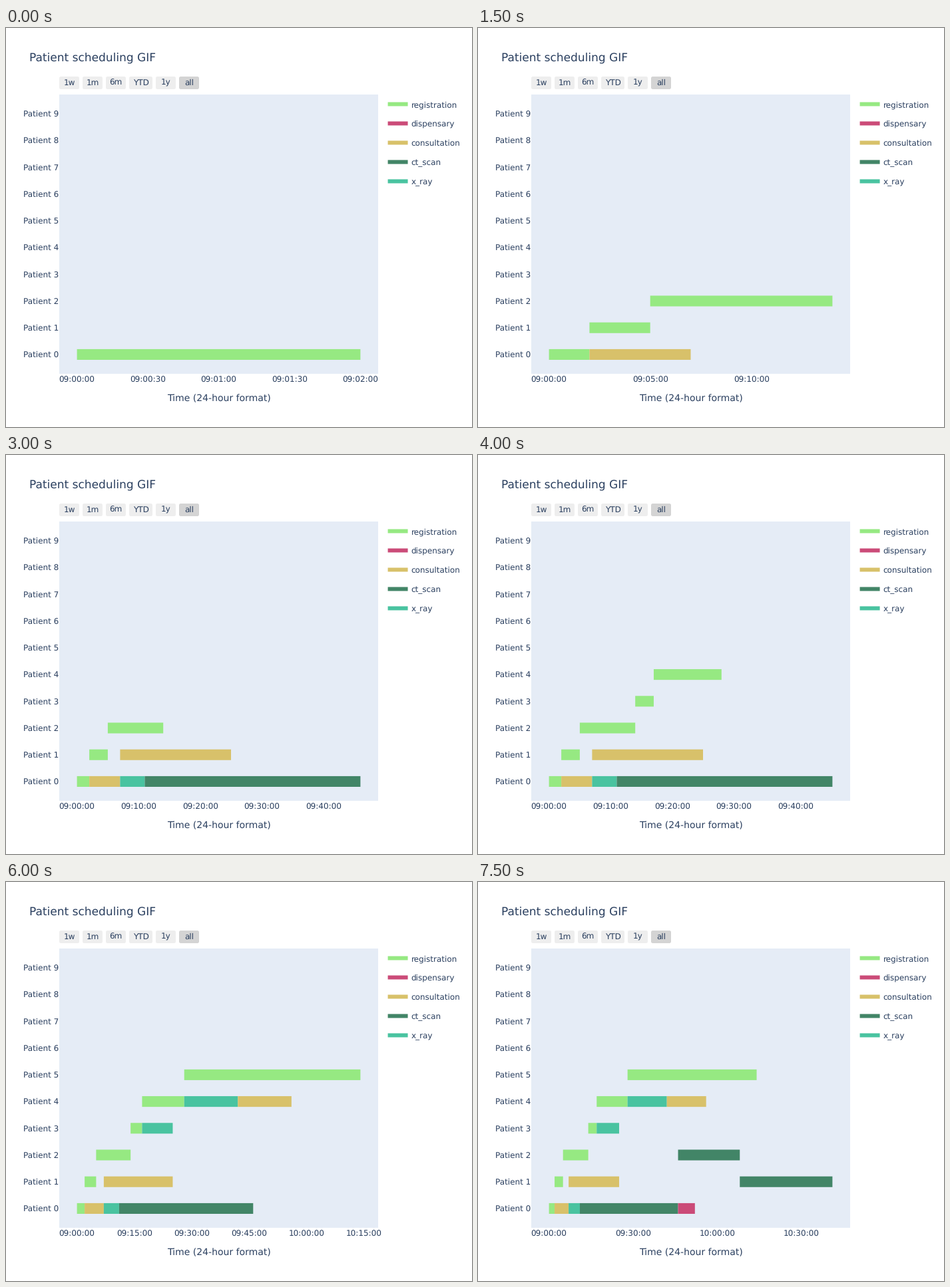
Write a matplotlib script that moves like this. It is 700 by 600 pixels and loops after 8000 ms.

```python
import matplotlib.pyplot as plt
import numpy as np
from matplotlib.animation import FuncAnimation
from matplotlib.patches import FancyBboxPatch, Rectangle

plt.rcParams.update({
    "font.family": "DejaVu Sans",
    "text.hinting": "none",
    "toolbar": "None",
})

W, H, DPI = 700, 600, 100
INK = "#2a3f5f"
LEFT, TOP, WIDTH, HEIGHT = 80, 100, 479, 420
PAD_X = WIDTH / 18
ROW = HEIGHT * 0.9 / 9.4
ROW0 = TOP + HEIGHT - 0.2 * ROW - HEIGHT / 20

COLORS = {
    "registration": "#96e982",
    "dispensary": "#cb4b78",
    "consultation": "#d8c16a",
    "ct_scan": "#428567",
    "x_ray": "#49c3a0",
}

# (patient, task, start minute, end minute) in order of scheduling
TASKS = [
    (0, "registration", 0, 2),
    (1, "registration", 2, 5),
    (0, "consultation", 2, 7),
    (2, "registration", 5, 14),
    (1, "consultation", 7, 25),
    (0, "x_ray", 7, 11),
    (0, "ct_scan", 11, 46),
    (3, "registration", 14, 17),
    (4, "registration", 17, 28),
    (3, "x_ray", 17, 25),
    (5, "registration", 28, 74),
    (4, "x_ray", 28, 42),
    (4, "consultation", 42, 56),
    (2, "ct_scan", 46, 68),
    (0, "dispensary", 46, 52),
    (1, "ct_scan", 68, 101),
]
TICK_STEPS = (0.5, 1, 2, 5, 10, 15, 30)

fig = plt.figure(figsize=(W / DPI, H / DPI), dpi=DPI, facecolor="white")
ax = fig.add_axes([0, 0, 1, 1])
ax.set(xlim=(0, W), ylim=(H, 0))
ax.axis("off")


def rect(x, y, w, h, color):
    return ax.add_patch(
        Rectangle((x, y), w, h, facecolor=color, linewidth=0, snap=False))


def label(x, y, text, size=12, ha="left"):
    return ax.text(x, y, text, fontsize=size * 72 / DPI, color=INK,
                   ha=ha, va="baseline")


def clock(minutes):
    s = int(round(minutes * 60))
    return f"{9 + s // 3600:02d}:{s // 60 % 60:02d}:{s % 60:02d}"


def draw_buttons():
    x = LEFT
    for name in ("1w", "1m", "6m", "YTD", "1y", "all"):
        w = 35 if name == "YTD" else 30
        ax.add_patch(FancyBboxPatch(
            (x, 73), w, 19, boxstyle="round,pad=0,rounding_size=2.5",
            facecolor="#d4d4d4" if name == "all" else "#eeeeee", linewidth=0))
        label(x + w / 2, 86, name, ha="center")
        x += w + 5


def draw_legend():
    for i, (name, color) in enumerate(COLORS.items()):
        y = 114.5 + 29 * i
        rect(573.58, y - 3, 30, 6, color)
        label(608.58, y + 4.5, name)


def draw_static():
    label(35, 50, "Patient scheduling GIF", 17)
    draw_buttons()
    rect(LEFT, TOP, WIDTH, HEIGHT, "#e5ecf6")
    for i in range(10):
        label(79, round(ROW0 - i * ROW + 4.2), f"Patient {i}", ha="right")
    label(LEFT + WIDTH / 2, 561, "Time (24-hour format)", 14, "center")
    draw_legend()


draw_static()
bars = [rect(0, ROW0 - p * ROW - 0.2 * ROW, 0, 0.4 * ROW, COLORS[task])
        for p, task, _, _ in TASKS]
ticks = [label(0, 533, "", ha="center") for _ in range(8)]


def update(frame):
    span = max(end for *_, end in TASKS[:frame + 1])
    scale = (WIDTH - 2 * PAD_X) / span
    x0 = LEFT + PAD_X

    for i, (bar, (_, _, start, end)) in enumerate(zip(bars, TASKS)):
        bar.set_visible(i <= frame)
        bar.set_x(x0 + start * scale)
        bar.set_width((end - start) * scale)

    full = WIDTH / scale
    step = next(s for s in TICK_STEPS if s >= full / 7)
    times = np.arange(0, span + PAD_X / scale, step)
    for i, tick in enumerate(ticks):
        tick.set_visible(i < len(times))
        if i < len(times):
            tick.set_x(x0 + times[i] * scale)
            tick.set_text(clock(times[i]))
    return bars + ticks


anim = FuncAnimation(fig, update, frames=len(TASKS), interval=500,
                     repeat=True, repeat_delay=0, blit=False)
plt.show()
```
